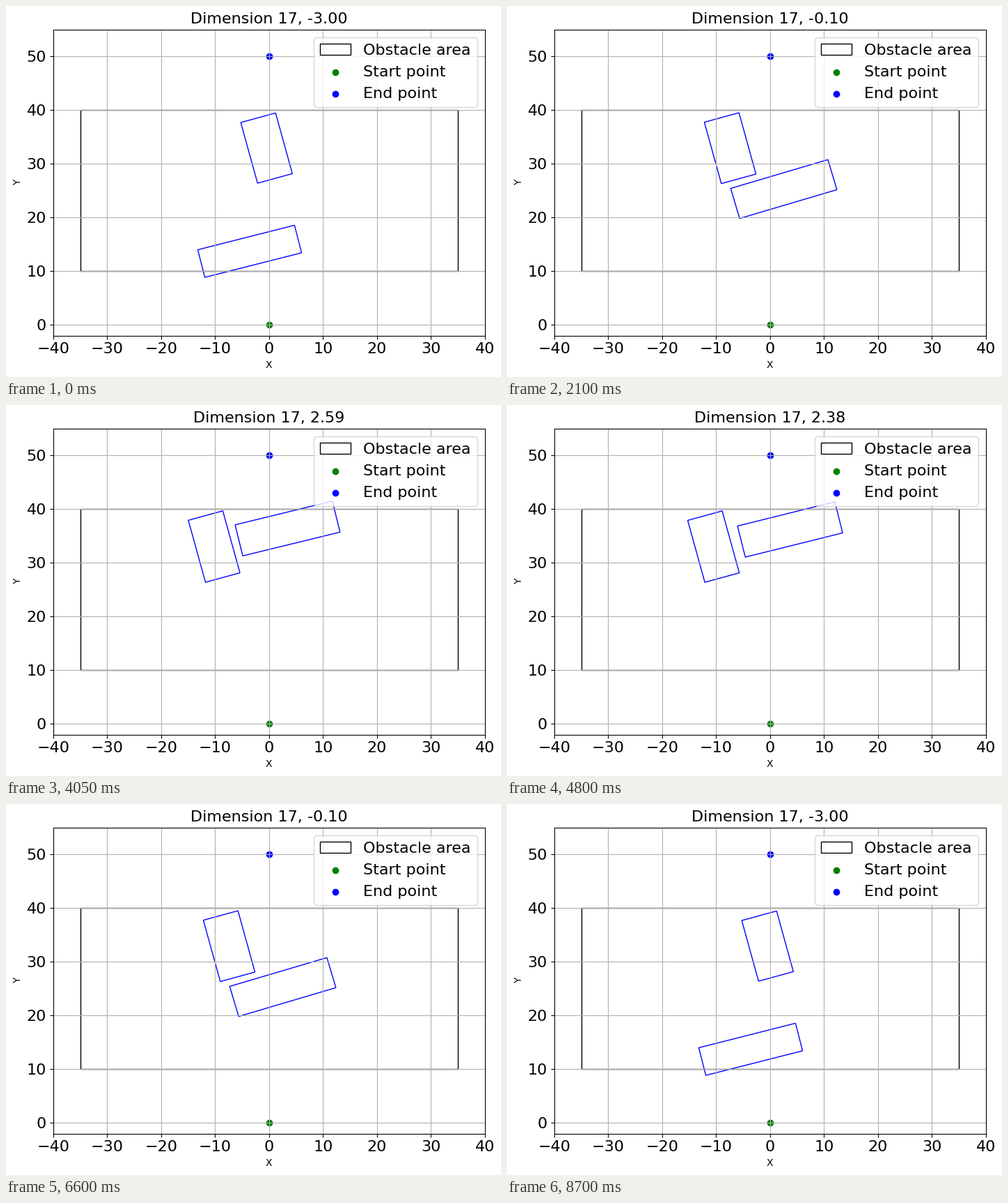
A matplotlib script for the animation above (8.85 s loop, 711 by 532 pixels).

```python
import numpy as np
import matplotlib.pyplot as plt
from matplotlib.animation import FuncAnimation
from matplotlib.patches import Rectangle

W, H, DPI = 711, 532, 100
STEPS = 30
FRAMES = 2 * STEPS - 1
PARTS = ("cx", "cy", "width", "height", "angle")


def wave(start, change=0, *amps):
    """Straight drift plus sine harmonics that vanish at both ends."""
    def at(p):
        return start + change * p + sum(
            a * np.sin((n + 1) * np.pi * p) for n, a in enumerate(amps))
    return at


LONG = dict(cx=wave(-3.58, 6.4, 3.15, -0.92),
            cy=wave(13.71, 22.9, 0.96, -2.54, 0.15),
            width=wave(18.5, 0, 0.3),
            height=wave(5.3, 0.6, 0.26, -0.08),
            angle=wave(14.3, -1, 2.7, 0.4))
SHORT = dict(cx=wave(-0.45, -9, -2.88, 1.54, -0.12),
             cy=wave(32.93, 0.12, -0.07),
             width=wave(6.69, -0.07),
             height=wave(11.72, 0.27),
             angle=wave(15.4))

plt.rcParams["font.family"] = "DejaVu Sans"
fig = plt.figure(figsize=(W / DPI, H / DPI), dpi=DPI)
ax = fig.add_axes([67.75 / W, 59.3 / H, 620 / W, 438.9 / H])


def outline(color, **kwargs):
    """Add an unfilled rectangle to the axes."""
    return ax.add_patch(Rectangle((-35, 10), 70, 30, fill=False,
                                  edgecolor=color, **kwargs))


outline("black", label="Obstacle area")
ax.scatter(0, 0, color="green", label="Start point")
ax.scatter(0, 50, color="blue", label="End point")
boxes = [(outline("blue", rotation_point="center"), motion)
         for motion in (LONG, SHORT)]

ax.set(xlim=(-40, 40), ylim=(-2, 55))
ax.tick_params(labelsize=16)
ax.set_xlabel("X", fontsize=10)
ax.set_ylabel("Y", fontsize=10)
ax.grid(True)
ax.legend(loc="upper right", fontsize=16)
title = ax.set_title("", fontsize=16)


def update(frame):
    # Sweep up to the last step, then back down
    p = min(frame, FRAMES - 1 - frame) / (STEPS - 1)
    for box, motion in boxes:
        cx, cy, w, h, angle = (motion[name](p) for name in PARTS)
        box.set_bounds(cx - w / 2, cy - h / 2, w, h)
        box.set_angle(angle)
    title.set_text(f"Dimension 17, {6 * p - 3:.2f}")
    return [title] + [box for box, _ in boxes]


anim = FuncAnimation(fig, update, frames=FRAMES, interval=150,
                     repeat=True, repeat_delay=0, blit=False)
plt.show()
```
